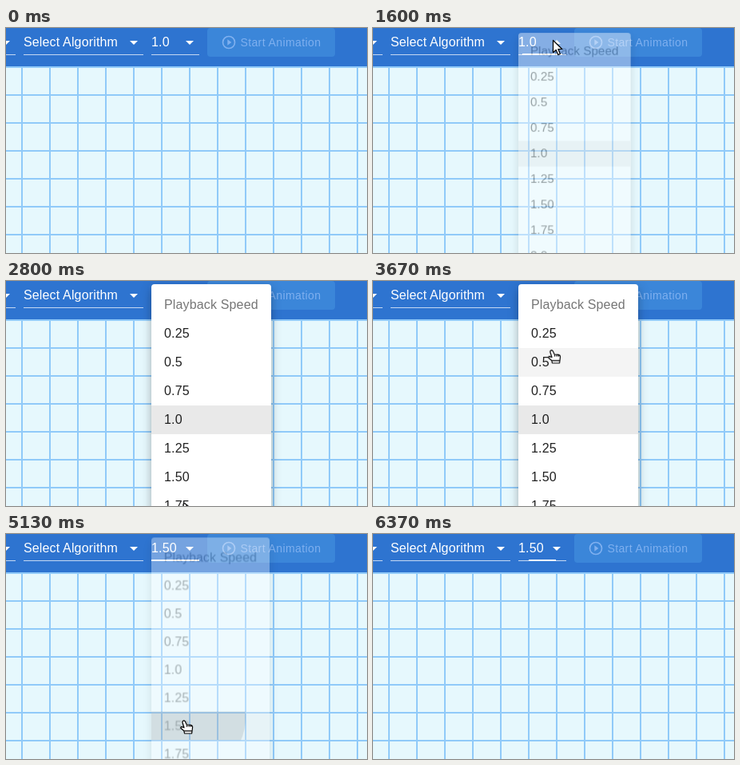
Animation, 452 px wide and 282 px high, one loop 6.41 s. Source, as an HTML page:

```html
<!DOCTYPE html>
<html lang="en">
<head>
<meta charset="utf-8">
<title>Playback speed menu</title>
<style>
  html, body { margin: 0; width: 100%; height: 100%; overflow: hidden; }
  body { font: 16px/24px "Liberation Sans", Arial, sans-serif; letter-spacing: .15px; }
  .stage, .stage div, .stage svg { position: absolute; }
  .stage { left: 0; top: 0; width: 452px; height: 282px; overflow: hidden; white-space: nowrap; }
  .run { animation: 6410ms linear infinite both; }
  .step { animation-timing-function: step-end; }

  .grid {
    inset: 48px 0 0;
    background:
      linear-gradient(90deg, #90caf9 2px, transparent 2px) 19px 0 / 35px 35px,
      linear-gradient(#90caf9 2px, transparent 2px) 0 0 / 35px 35px,
      #e6f8fd;
  }
  .bar { left: 0; top: 0; width: 452px; height: 48px; background: #2e74d0; color: #fff; }

  .select { top: 2px; height: 32px; line-height: 19px; }
  .select .text { left: 0; top: 6px; }
  .select svg { right: 0; top: 4px; width: 24px; height: 24px; fill: #fff; }
  .line, .thick { left: 0; right: 0; bottom: 0; height: 1px; background: rgba(255, 255, 255, .72); }
  .thick { height: 2px; background: #fff; }

  .button {
    left: 252px; top: 0; width: 160px; height: 36px; border-radius: 4px;
    background: #3b86d9; color: #7fb0ef; font-size: 14px; line-height: 36px; letter-spacing: .4px;
  }
  .button span { position: absolute; left: 41.4px; }
  .button svg { left: 17px; top: 8px; width: 20px; height: 20px; }

  .menu {
    left: 182px; top: 4px; width: 150px; height: 340px; border-radius: 4px;
    background: #fff; color: rgba(0, 0, 0, .87); transform-origin: 0 19px;
    box-shadow: 0 5px 5px -3px rgba(0, 0, 0, .2), 0 8px 10px 1px rgba(0, 0, 0, .14), 0 3px 14px 2px rgba(0, 0, 0, .12);
    animation-name: menu-fade, menu-grow;
  }
  .list { inset: 0; overflow: hidden; border-radius: 4px; }
  .list p { position: relative; margin: 0; padding-left: 16px; height: 36px; line-height: 36px; }
  .list p:first-of-type { margin-top: 8px; color: rgba(0, 0, 0, .54); }
  .row { left: 0; top: 44px; width: 150px; height: 36px; overflow: hidden; }
  .hover { background: #f4f4f4; animation-name: hover; }
  .chosen { background: #e9e9e9; animation-name: chosen; }
  .ripple {
    left: -69px; top: -104px; width: 220px; height: 220px; border-radius: 50%;
    background: rgba(0, 0, 0, .26); animation-name: ripple;
  }

  .cursor { left: 0; top: 0; animation-name: move; }
  .cursor svg { overflow: visible; fill: #fff; stroke: #000; stroke-width: 1.2; stroke-linejoin: round; }
  .hand { left: -5px; top: -1px; width: 17px; height: 18px; animation-name: hand; }
  .arrow { left: 0; top: 0; width: 13px; height: 20px; animation-name: arrow; }

  .old { animation-name: old-value; }
  .new { animation-name: new-value; }
  .flip { animation-name: flip; }
  .alg-hover { animation-name: alg-hover; }
  .speed-hover { animation-name: speed-hover; }
  .focus { animation-name: focus; }

  @keyframes menu-fade {
    0% { opacity: 0; }
    23.37% { opacity: 0; animation-timing-function: cubic-bezier(.4, 0, .2, 1); }
    28.39% { opacity: 1; }
    77.93% { opacity: 1; animation-timing-function: cubic-bezier(.4, 0, .2, 1); }
    82.95%, 100% { opacity: 0; }
  }
  @keyframes menu-grow {
    0% { transform: scale(.75, .5625); }
    23.37% { transform: scale(.75, .5625); animation-timing-function: cubic-bezier(.4, 0, .2, 1); }
    26.71% { transform: none; }
    79.59% { transform: none; animation-timing-function: cubic-bezier(.4, 0, .2, 1); }
    82.95%, 100% { transform: scale(.75, .5625); }
  }
  @keyframes hover {
    0% { transform: translateY(400px); }
    30.59%, 57.44% { transform: none; }
    32.4%, 55.37%, 61.79% { transform: translateY(36px); }
    34.23%, 53.31%, 63.95% { transform: translateY(72px); }
    36.07%, 51.23%, 66.08% { transform: translateY(108px); }
    37.91%, 49.17%, 68.22% { transform: translateY(144px); }
    39.78%, 45.24%, 72.45%, 100% { transform: translateY(180px); }
    40.98%, 43.84% { transform: translateY(216px); }
    42.12% { transform: translateY(252px); }
  }
  @keyframes chosen {
    0% { transform: translateY(108px); }
    77.93%, 100% { transform: translateY(180px); }
  }
  @keyframes ripple {
    0% { transform: scale(0); }
    76.13% { transform: scale(0); animation-timing-function: cubic-bezier(.4, 0, .2, 1); }
    84.71%, 100% { transform: none; }
  }
  @keyframes old-value { 0% { opacity: 1; } 77.93%, 100% { opacity: 0; } }
  @keyframes new-value { 0% { opacity: 0; } 77.93%, 100% { opacity: 1; } }
  @keyframes flip {
    0%, 77.93%, 100% { transform: none; }
    23.37% { transform: rotate(180deg); }
  }
  @keyframes alg-hover {
    0%, 9.98%, 95.16%, 100% { opacity: 0; }
    7.33%, 93.48% { opacity: 1; }
  }
  @keyframes speed-hover {
    0%, 23.37%, 100% { opacity: 0; }
    16.4% { opacity: 1; }
  }
  @keyframes focus {
    0% { transform: scaleX(0); }
    23.37% { transform: scaleX(0); animation-timing-function: cubic-bezier(0, 0, .2, 1); }
    26.49% { transform: none; animation-timing-function: step-end; }
    99.3%, 100% { transform: scaleX(.56); }
  }
  @keyframes hand {
    0%, 23.37%, 95.16%, 100% { opacity: 0; }
    7.3%, 30.59% { opacity: 1; }
  }
  @keyframes arrow {
    0%, 30.59%, 100% { opacity: 0; }
    23.37% { opacity: 1; }
  }
  @keyframes move {
    0%, 7.33% { transform: translate(112px, 16px); }
    9.98% { transform: translate(122px, 37px); }
    12.48% { transform: translate(130px, 47px); }
    14.04% { transform: translate(142px, 48px); }
    17.16%, 17.63% { transform: translate(208px, 17px); }
    20.28%, 28.08% { transform: translate(225px, 15px); }
    29.64% { transform: translate(226px, 30px); }
    37.91%, 38.53% { transform: translate(225px, 192px); }
    41.19% { transform: translate(240px, 270px); }
    43.06% { transform: translate(236px, 318px); }
    43.68% { transform: translate(224px, 279px); }
    48.36%, 48.83% { transform: translate(223px, 234px); }
    58.81%, 60.37% { transform: translate(224px, 60px); }
    69.89%, 71.14% { transform: translate(227px, 220px); }
    73.32%, 80.11% { transform: translate(223px, 234px); }
    80.66% { transform: translate(210px, 214px); }
    83.78%, 90.17% { transform: translate(184px, 130px); }
    94.07%, 100% { transform: translate(118px, 15px); }
  }
</style>
</head>
<body>
<div class="stage">
  <div class="grid"></div>
  <div class="bar">
    <div class="select" style="left:-60px;width:72px">
      <svg viewBox="0 0 24 24"><path d="M7 10l5 5 5-5z"/></svg>
      <div class="line"></div>
    </div>
    <div class="select" style="left:22px;width:150px">
      <div class="text">Select Algorithm</div>
      <svg viewBox="0 0 24 24"><path d="M7 10l5 5 5-5z"/></svg>
      <div class="line"></div>
      <div class="thick run step alg-hover"></div>
    </div>
    <div class="select" style="left:182px;width:60px">
      <div class="text run step old">1.0</div>
      <div class="text run step new">1.50</div>
      <svg class="run step flip" viewBox="0 0 24 24"><path d="M7 10l5 5 5-5z"/></svg>
      <div class="line"></div>
      <div class="thick run step speed-hover"></div>
      <div class="thick run focus"></div>
    </div>
    <div class="button">
      <svg viewBox="0 0 24 24" fill="#7fb0ef">
        <circle cx="12" cy="12" r="9" fill="none" stroke="#7fb0ef" stroke-width="2"/>
        <path d="M10 16.5l6-4.5-6-4.5z"/>
      </svg>
      <span>Start Animation</span>
    </div>
  </div>

  <div class="menu run">
    <div class="list">
      <div class="row hover run step"></div>
      <div class="row chosen run step"></div>
      <div class="row" style="top:224px"><div class="ripple run"></div></div>
      <p>Playback Speed</p>
      <p>0.25</p>
      <p>0.5</p>
      <p>0.75</p>
      <p>1.0</p>
      <p>1.25</p>
      <p>1.50</p>
      <p>1.75</p>
      <p>2.0</p>
    </div>
  </div>

  <div class="cursor run">
    <svg class="hand run step" viewBox="0 0 17 18">
      <path d="M3.2 1.6Q4.8.2 6.2 1.8L8.2 6 13 6.3Q15.5 6.8 15.6 9L15.2 12.5 14.6 17H5.5L4.9 13.8 1 10.5Q.4 8.9 2 8.6L5 9.8 2.9 3Z"/>
      <path d="M5.2 13.9H15M8.6 6.3v2.4M11.2 6.4v2.3M13.4 6.8v2" fill="none"/>
    </svg>
    <svg class="arrow run step" viewBox="0 0 13 20">
      <path d="M.5.5V15.8l3.7-3.3 2.6 6.1 2.6-1.1-2.6-6h5z"/>
    </svg>
  </div>
</div>
</body>
</html>
```
